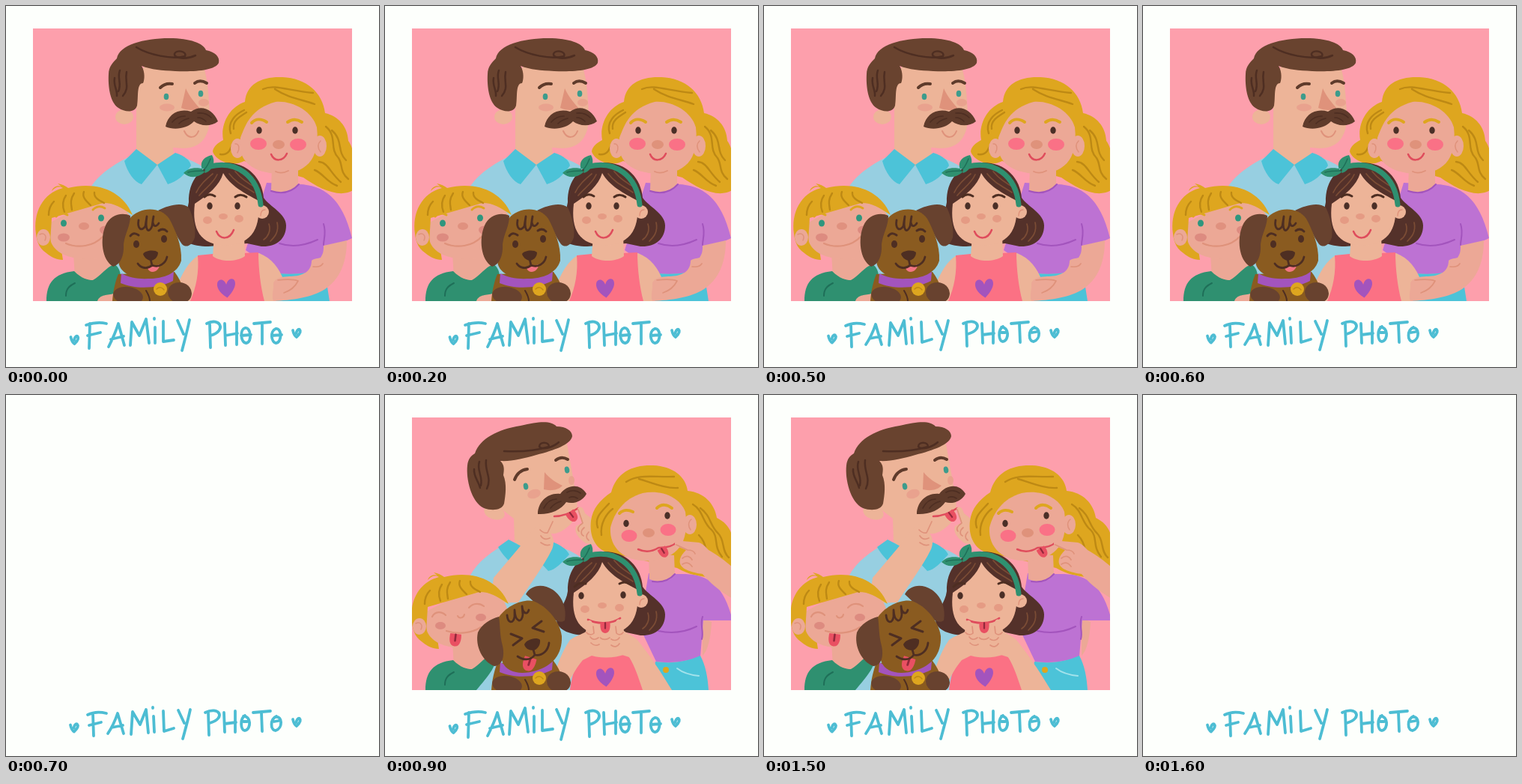
An HTML page with a canvas for the animation above (1800 ms loop, 498 by 482 pixels).

```html
<!DOCTYPE html>
<html lang="en">
<head>
<meta charset="utf-8">
<title>Family photo</title>
<style>
html, body { margin: 0; width: 100%; height: 100%; overflow: hidden; background: #fdfffc; }
canvas { display: block; }
</style>
</head>
<body>
<canvas id="stage" width="498" height="482" role="img" aria-label="Family photo"></canvas>
<script>
const ctx = document.getElementById('stage').getContext('2d');
const LOOP = 1800, SHOT = 900, FLASH = 700, WOBBLE = 500;
const C = {
  paper: '#fdfffc', pink: '#fd9fac', teal: '#4cc3d8', ink: '#4dbdd3',
  skin: '#edb498', rosy: '#eca896', blush: '#df927b', brown: '#69432f', dark: '#4e2e22', tache: '#5f3b2b',
  shirt: '#97cfe1', gold: '#dea61f', goldLine: '#bd8914', purple: '#bd72d3', violet: '#a354bd',
  green: '#2f9070', leaf: '#1f6f58', bob: '#54312a', coral: '#fb7184', hot: '#fa7186',
  mouth: '#df4c5c', red: '#e95062', wine: '#93283b', fur: '#8a5b20', ear: '#68422f', eye: '#4b2f27'
};

const fill = (color, d) => { ctx.fillStyle = color; ctx.fill(new Path2D(d)); };
const line = (color, w, d) => { ctx.strokeStyle = color; ctx.lineWidth = w; ctx.stroke(new Path2D(d)); };
function oval(color, x, y, rx, ry = rx, turn = 0) {
  ctx.fillStyle = color;
  ctx.beginPath();
  ctx.ellipse(x, y, rx, ry, turn, 0, Math.PI * 2);
  ctx.fill();
}
function heart(color, x, y, s, turn = 0) {
  ctx.save();
  ctx.translate(x, y);
  ctx.rotate(turn);
  ctx.scale(s, s);
  fill(color, 'M0 1C-.9 .35 -1.1 -.3 -.9 -.75C-.65 -1.15 -.15 -1 0 -.4C.2 -1 .7 -1.15 .92 -.75C1.1 -.3 .7 .4 0 1Z');
  ctx.restore();
}
function tongue(x, y, turn, s = 1) {
  ctx.save();
  ctx.translate(x, y);
  ctx.rotate(turn);
  ctx.scale(s, s);
  fill(C.red, 'M-7 -5L7 -5C8 2 7 11 0 11C-7 11 -8 2 -7 -5Z');
  line(C.wine, 2.5, 'M0 -4L0 4');
  ctx.restore();
}

function dadCalm() {
  fill(C.shirt, 'M113 242C126 222 149 208 174 197L222 197C242 203 262 212 272 222L285 394L105 394Z');
  oval(C.skin, 158, 148, 12, 10);
  fill(C.skin, 'M174 100L186 78L264 82C269 96 271 120 272 145C273 172 262 190 236 190L223 189L224 199L201 214L174 194Z');
  fill(C.teal, 'M174 191L202 212L181 238C171 235 162 222 158 207Z');
  fill(C.teal, 'M202 212L226 196C238 200 246 206 247 213C238 226 229 234 216 238Z');
  fill(C.brown, 'M148 70C151 52 184 43 218 43C246 43 264 50 267 59C279 61 286 68 284 76C279 86 253 88 226 87C208 86 194 85 181 80C186 88 185 99 183 103C174 103 177 122 175 133C172 143 159 142 150 136C139 129 136 107 137 91C137 81 143 75 148 70Z');
  line(C.dark, 2.5, 'M174 55C190 65 222 72 239 67C242 60 227 58 225 64C224 70 240 72 253 66M152 86C148 96 155 104 150 114M161 88C158 102 166 108 156 120M145 96C143 106 149 112 148 120');
  fill(C.blush, 'M240 110C245 121 252 129 258 136C251 141 241 139 234 136Z');
  oval('#e9a28e', 215, 135.5, 10, 5);
  oval('#e9a28e', 264, 129, 7, 5);
  line(C.tache, 4, 'M206 109C210 105 216 103 222 104M252 103C257 99 263 100 268 103');
  oval('#3c9c8c', 214, 121, 3.3, 4.3);
  oval('#3c9c8c', 260, 117, 3.3, 4.3);
  line(C.blush, 2, 'M238 167C243 178 253 177 257 167');
  fill(C.tache, 'M213 161C216 145 230 136 247 141C260 131 276 137 283 154C273 162 259 160 251 154C242 164 224 166 213 161Z');
  line(C.dark, 1.7, 'M222 155C227 149 233 147 239 147M231 157C235 153 240 151 244 150M256 143C264 142 270 145 274 149M256 149C260 149 264 151 267 154');
}

function dadSilly() {
  fill(C.shirt, 'M113 242C124 222 143 208 165 197L222 200C242 204 262 214 270 226L282 394L105 394Z');
  oval(C.skin, 146, 157, 14, 9, .3);
  fill(C.skin, 'M155 86L243 65C246 83 250 103 253 122C258 140 260 163 245 175C237 182 229 186 222 185L223 202L202 222L173 196L172 165L150 148Z');
  fill(C.teal, 'M165 193L184 203L175 229C162 220 155 210 151 203Z');
  fill(C.teal, 'M206 222L223 196C234 200 243 206 246 213C235 225 228 233 218 235Z');
  fill(C.brown, 'M120 78C127 58 150 46 181 41C206 35 222 34 229 42C242 42 250 48 250 55C248 66 226 74 202 80C184 85 168 89 154 88C160 94 159 100 158 107C163 119 161 133 159 145C156 154 143 155 132 151C115 143 108 112 110 94C111 85 115 81 120 78Z');
  line(C.dark, 2.5, 'M159 75C177 76 199 75 219 69C219 62 206 62 206 69C210 74 224 70 232 63M126 89C122 101 131 108 128 121M135 87C133 103 143 110 136 125M119 99C118 109 125 115 127 124');
  fill(C.blush, 'M213 103C220 112 229 117 237 121C230 128 220 128 212 126Z');
  oval('#e9a28e', 199, 132, 9, 6, -.3);
  oval('#e9a28e', 249, 114, 4, 6);
  line(C.tache, 4, 'M173 113C176 105 182 100 190 99M228 87C233 83 239 83 244 86');
  oval('#3c9c8c', 188, 122, 3.2, 4.5, -.2);
  oval('#3c9c8c', 243, 100, 3.2, 4.5, -.2);
  line(C.mouth, 2.5, 'M226 162C238 162 249 157 258 151');
  tongue(249, 160, -.65, .9);
  fill(C.tache, 'M204 159C204 143 217 130 234 132C244 119 261 118 269 132C263 143 250 146 242 143C235 154 219 160 204 159Z');
  line(C.dark, 1.7, 'M212 151C216 143 222 139 229 139M221 151C225 146 230 143 235 142M243 130C250 126 257 128 261 131M246 137C250 135 254 136 257 138');
  // raised arm and both pulling hands
  fill(C.skin, 'M145 244L178 205L193 186C199 174 213 173 218 161C222 158 226 162 224 169L219 183C227 189 226 201 222 208C212 228 194 252 178 277L140 278Z');
  line(C.blush, 1.7, 'M224 169L217 184C212 185 209 182 207 180M220 191C214 194 210 191 208 188M220 200C214 202 211 199 208 197');
  fill(C.skin, 'M257 151C262 147 265 151 267 158L276 165L281 200L268 198C258 191 252 183 255 175L263 171Z');
  line(C.blush, 1.7, 'M258 153L264 171C258 175 256 179 259 182M266 177C261 181 261 186 265 188M272 183C268 187 268 191 272 194');
}

function momHair(silly) {
  fill(C.gold, silly
    ? 'M302 130C309 103 331 93 358 94C384 95 402 109 404 128C426 130 440 145 443 164C455 170 461 178 464 190L464 239C444 246 414 245 390 231L306 212C285 211 272 193 275 168C277 152 287 140 302 130Z'
    : 'M319 128C321 104 341 94 369 95C401 96 423 116 426 143C444 147 456 161 457 180C462 187 464 195 465 206L465 245C447 258 418 244 397 229L318 207C301 216 279 206 276 194C277 187 284 182 290 179C286 158 298 135 319 128Z');
  line(C.goldLine, 2.4, silly
    ? 'M322 116C338 105 358 110 386 109M339 112C356 117 374 125 391 124M284 177C279 163 290 155 299 145M289 187C287 171 296 158 304 152M411 146C425 154 424 171 436 180C446 190 438 202 450 216M421 151C436 162 433 174 445 185C454 194 449 208 459 217M419 187C432 200 425 213 440 227'
    : 'M343 111C359 104 376 113 410 116M359 111C377 123 396 125 412 131M300 170C295 155 307 144 318 139M286 198C298 200 300 190 304 181M304 164C302 153 313 147 321 142M427 161C443 174 431 190 444 203C450 212 445 221 457 231M435 166C451 180 441 193 454 206M418 208C430 209 433 223 447 235M412 219C423 223 428 235 442 240');
}

function momCalm() {
  momHair(false);
  oval(C.rosy, 309, 190, 9, 13);
  oval(C.rosy, 419, 187, 9, 14);
  line(C.blush, 1.5, 'M306 184C312 184 312 191 309 196M420 180C415 185 417 191 420 195');
  fill(C.purple, 'M348 236L391 238C423 239 449 255 462 310C453 315 438 319 425 320L424 351C401 358 383 359 363 357L320 326Z');
  fill(C.rosy, 'M355 215L390 216L390 238C382 249 368 252 354 246Z');
  line(C.violet, 2, 'M354 247C370 252 382 248 391 238M424 291C428 303 424 311 424 319M365 317C383 323 401 319 416 312');
  fill(C.rosy, 'M313 176C320 158 327 137 360 128C382 126 409 140 415 162C420 207 398 224 365 224C329 223 308 207 313 176Z');
  line(C.gold, 4, 'M328 156C334 150 340 150 348 155M376 155C383 150 389 151 395 155');
  oval(C.eye, 338, 166, 3.7, 4.7);
  oval(C.eye, 386, 166, 3.7, 4.7);
  oval(C.hot, 337, 184, 11, 8);
  oval(C.hot, 390, 185, 11, 8);
  oval(C.blush, 364, 185, 8, 6);
  line(C.mouth, 2.5, 'M354 198C358 208 370 208 375 197');
  line(C.blush, 1.8, 'M360 221C366 224 373 222 377 220');
  fill(C.teal, 'M363 357C385 359 405 357 425 350L432 394L360 394Z');
}

function momSilly() {
  momHair(true);
  oval(C.rosy, 407, 173, 9, 13);
  line(C.blush, 1.5, 'M409 166C404 170 405 176 408 180');
  fill(C.rosy, 'M424 298L436 303C435 321 432 340 424 348Z');
  fill(C.purple, 'M352 238L390 239C425 238 451 246 464 301L425 301L421 349C401 357 382 358 362 356L340 310Z');
  fill(C.rosy, 'M352 212L386 214L387 239C379 251 366 251 353 246Z');
  line(C.violet, 2, 'M357 249C371 251 380 247 387 239M424 296C420 307 426 315 423 326M365 315C384 319 402 316 416 309');
  fill(C.rosy, 'M301 177C306 157 319 138 344 131C370 126 394 137 401 156C407 199 389 217 358 221C324 225 299 207 301 177Z');
  line(C.gold, 4, 'M313 158C318 153 325 153 331 156M363 151C369 145 377 146 383 151');
  oval(C.eye, 322, 171.5, 3.7, 4.7);
  oval(C.eye, 377, 161, 3.7, 4.7);
  oval(C.hot, 326, 188, 10.5, 8);
  oval(C.hot, 378, 180, 10.5, 8);
  oval(C.blush, 352, 184, 8, 6);
  line(C.mouth, 2.5, 'M338 206C347 210 357 209 365 204C374 204 384 203 390 196');
  tongue(371, 208, -.55, .85);
  fill(C.rosy, 'M388 201C384 195 391 191 397 195L419 197C425 199 428 203 432 207C446 215 456 223 464 230L464 272C447 262 433 250 424 239C410 237 396 233 394 225C392 218 398 211 402 207Z');
  line(C.blush, 1.7, 'M389 200L404 207C410 207 413 209 414 212M397 218C403 213 408 216 410 220M397 226C403 222 407 225 410 229');
  fill(C.teal, 'M361 356C384 359 403 356 421 348C428 361 431 377 432 394L355 394Z');
  line('#a3e2eb', 2, 'M390 365C399 372 409 374 419 375');
  oval(C.gold, 375, 367, 4);
}

function boy(silly) {
  const hair = 'M40 304C36 276 49 250 76 243C70 240 66 242 61 247C63 241 69 239 74 241L69 237C75 238 79 240 83 243C119 234 155 245 169 279C153 269 145 263 130 263L61 283L58 332C45 326 41 315 40 304Z';
  fill(C.rosy, 'M90 330L135 322L142 350L112 372L92 362Z');
  fill(C.green, 'M54 394C54 370 64 357 91 354C101 364 109 366 116 366C126 361 134 348 145 345' +
    (silly ? 'C154 358 137 376 122 394Z' : 'C157 352 154 374 150 394Z'));
  line(C.leaf, 2, 'M80 387C80 378 84 374 92 370');
  if (!silly) fill(C.rosy, 'M122 394C125 385 136 386 144 384L160 394Z');
  ctx.save();
  if (silly) ctx.translate(-4, 0);
  fill(C.gold, 'M43 310L70 300L76 339C59 338 47 327 43 310Z');
  fill(C.rosy, 'M56 291C78 278 106 265 142 260C161 270 169 280 168 297C165 325 142 336 112 338C80 338 65 328 60 315Z');
  fill(C.gold, hair);
  oval(C.rosy, 50, 309, 9, 11);
  line(C.blush, 1.5, 'M45 305C51 302 55 307 52 313');
  line(C.goldLine, 2.4, 'M80 253C75 260 75 267 78 275M91 250C85 259 87 265 88 272M104 248C101 256 108 261 113 266M118 249C117 256 125 260 131 263M64 261C58 267 57 273 57 279');
  ctx.restore();
  if (silly) {
    line(C.blush, 2.2, 'M63 296C67 288 76 289 81 294M112 284C118 277 127 278 132 282M82 315C98 320 116 318 128 310');
    oval('#dd8b80', 74, 308, 7, 5);
    oval('#dd8b80', 128, 297, 7, 5);
    line(C.blush, 2, 'M97 295C99 299 105 298 106 293');
    tongue(94, 324, .12, 1.05);
  } else {
    line(C.gold, 3, 'M67 281C71 276 77 276 82 279M116 272C121 267 127 267 132 270');
    oval('#2f967e', 77, 290, 4, 4.5);
    oval('#2f967e', 127, 283, 4, 4.5);
    oval('#dd8b80', 77, 309, 8, 5.5);
    oval('#dd8b80', 132, 299, 7, 5.5);
    oval('#e0917f', 104, 294, 7, 5);
    line(C.blush, 2.2, 'M80 317C96 324 117 321 129 308');
  }
}

function dogBody() {
  fill(C.fur, 'M150 358L225 355C235 368 240 384 239 394L142 394C143 380 146 367 150 358Z');
  fill(C.violet, 'M154 357C174 368 204 366 224 354L223 367C204 377 174 379 153 370Z');
  line(C.dark, 2, 'M187 380C190 385 192 389 192 394');
  oval(C.ear, 163, 387, 20, 12, .15);
  oval(C.gold, 206, 378, 9);
  line(C.goldLine, 1.5, 'M201 378C205 374 209 376 211 379');
  oval(C.ear, 232, 383, 16, 14, .2);
}

function dogCalm() {
  dogBody();
  fill(C.ear, 'M203 273C216 266 235 261 244 269C250 281 254 299 252 309C249 319 241 324 235 318C227 307 223 294 214 285Z');
  fill(C.fur, 'M165 284C178 268 206 267 218 284C226 299 235 319 234 340C229 357 211 364 190 364C169 364 151 357 150 340C151 321 155 300 165 284Z');
  fill(C.ear, 'M166 280C154 274 138 280 133 293C125 311 128 339 143 348C153 345 158 333 157 318C159 303 166 294 166 280Z');
  line(C.dark, 2.8, 'M177 286C175 297 181 302 186 294L188 281C185 301 191 304 195 294L197 281C194 292 199 298 204 290');
  oval(C.dark, 174, 318, 4, 5);
  oval(C.dark, 211, 311, 4, 5);
  line(C.dark, 3, 'M166 307C169 303 173 303 177 306M204 300C208 297 212 298 215 301');
  fill(C.dark, 'M183 331C186 326 199 325 203 329C203 336 197 340 193 340C188 339 184 335 183 331Z');
  fill('#f27483', 'M189 350L205 345C205 355 192 359 189 350Z');
  line(C.dark, 2.8, 'M193 338L195 346C189 352 180 350 176 344M195 346C204 350 213 344 215 335');
}

function dogSilly() {
  dogBody();
  fill(C.ear, 'M188 266C194 254 210 251 224 260C237 269 243 285 240 301C233 306 225 300 219 292L206 283Z');
  fill(C.fur, 'M151 298C161 282 183 272 198 275C216 282 233 301 236 322C237 346 224 361 202 368C182 374 163 371 157 357C150 339 148 318 151 298Z');
  fill(C.ear, 'M152 296C141 299 129 306 124 317C120 335 130 356 146 362C157 361 160 349 157 335C153 321 154 309 152 296Z');
  line(C.dark, 2.8, 'M163 294C164 305 171 306 173 296L173 287C174 304 183 305 184 293L183 282C184 292 190 294 192 287');
  line(C.dark, 3, 'M168 319L183 325L171 334M209 302L197 311L212 316');
  tongue(193, 356, .3, 1.15);
  fill(C.dark, 'M186 333C188 327 202 322 207 327C208 334 203 340 198 341C192 341 187 338 186 333Z');
  line(C.dark, 2.8, 'M198 340L200 347C194 355 184 354 177 349M200 347C210 349 218 341 219 331');
}

function girlHead() {
  fill(C.bob, 'M244 262C243 234 260 210 292 209C324 209 342 231 344 256C352 268 374 277 374 293C374 312 360 322 341 321L322 317L270 321C249 321 230 314 229 301C230 288 242 278 244 262Z');
  oval(C.skin, 342, 275, 9);
  line(C.blush, 1.5, 'M346 272C341 272 340 276 340 280');
  fill(C.skin, 'M278 306L318 306L319 334C307 342 287 342 276 334Z');
  fill(C.skin, 'M252 264C270 252 285 240 290 223C299 240 319 250 337 260C340 293 331 318 294 320C259 319 248 298 252 264Z');
  line('#7b4c35', 1.7, 'M276 224C268 231 259 238 254 249M282 225C276 238 266 243 258 253M298 224C307 236 319 241 331 249M306 221C315 232 325 238 335 243M351 291C354 300 350 308 344 312M362 289C365 302 358 309 353 314');
  line(C.green, 7, 'M273 214C307 206 336 226 340 265');
  fill(C.green, 'M266 218C251 214 243 217 237 223C246 231 257 229 265 222ZM262 218C258 208 265 201 275 199C280 207 277 219 266 223Z');
  line(C.leaf, 1.5, 'M243 222C250 220 257 220 264 220M265 218C269 214 271 209 273 204');
}

function girlCalm() {
  fill(C.skin, 'M278 314L317 314L319 332L338 330C355 337 365 350 371 367L359 394L222 394C229 370 239 344 257 333L277 332Z');
  fill(C.coral, 'M256 333L276 331C285 339 307 339 317 330L337 329C337 351 340 375 345 394L246 394C254 376 258 355 256 333Z');
  girlHead();
  line(C.dark, 3, 'M265 255C269 251 274 251 279 254M306 255C311 251 317 252 321 255');
  oval(C.eye, 272, 267, 3.7, 4.7);
  oval(C.eye, 309, 267, 3.7, 4.7);
  oval('#e59b84', 269, 286, 6, 5);
  oval('#e59b84', 311, 284, 6, 5);
  oval('#e59b84', 290, 281, 6, 4);
  line(C.mouth, 2.5, 'M281 301C286 313 299 312 304 299');
  fill(C.rosy, 'M424 320L455 313C455 344 445 365 426 378C409 389 381 393 357 394C354 387 358 378 357 370C362 358 382 363 393 359C405 356 408 347 408 340C411 337 417 337 420 336C424 330 424 326 424 320Z');
  line(C.blush, 1.7, 'M363 366C372 365 382 364 390 367M390 367C386 375 380 380 371 383M410 348C417 349 421 347 423 344');
}

function girlSilly() {
  fill(C.coral, 'M270 345C286 352 303 351 320 345C336 357 341 374 345 394L247 394C250 373 254 356 270 345Z');
  girlHead();
  fill(C.skin, 'M276 318L319 318L321 346C305 352 285 352 270 346Z');
  line(C.dark, 3, 'M253 256C258 251 263 250 268 252M313 252C318 249 324 250 328 253');
  oval(C.eye, 262, 268, 3.7, 4.7);
  oval(C.eye, 318, 267, 3.7, 4.7);
  oval('#e59b84', 267, 286, 6, 5);
  oval('#e59b84', 313, 284, 6, 5);
  oval('#e59b84', 290, 281, 6, 4);
  line(C.mouth, 2.7, 'M271 300C282 306 303 306 314 298');
  tongue(294, 308, 0, .9);
  line(C.blush, 1.7, 'M287 324C291 327 296 327 300 324');
  fill(C.skin, 'M270 303C273 298 277 302 278 308L280 315C290 321 290 337 282 345L264 354C253 367 246 382 241 394L222 394C226 370 234 346 247 327C254 322 264 319 268 316Z');
  fill(C.skin, 'M315 301C311 297 307 301 308 308L307 317C299 324 300 338 310 345L326 350C334 363 339 379 344 394L383 394C367 367 348 340 336 326C329 321 323 318 319 315Z');
  line(C.blush, 1.7, 'M278 309L279 318C276 321 271 320 269 317M285 324C280 328 276 326 274 323M286 333C280 336 277 333 275 331M308 309L309 318C312 321 316 320 318 317M302 326C307 329 311 327 313 324M302 334C307 338 311 335 313 332');
}

const LETTERS = [
  'M112 424L111 457M107 426C116 423 126 422 134 424M109 440L126 436M137 455C142 445 147 434 150 424L158 453M140 445L157 441M166 453L168 422L178 440L187 418L191 450M199 429L199 450M198 417L198 418M210 421L210 448L224 446M229 420L237 438M245 419C242 434 238 448 235 460M272 425L273 456M268 424C285 415 296 433 273 440M292 424L293 453M308 422L308 452M293 440L309 437M319 430C312 432 313 450 321 450C329 449 327 428 319 430M314 440L327 439M331 424L353 422M342 424L342 451M360 431C352 434 354 450 361 450C369 448 368 429 360 431M355 440L368 439',
  'M116 425L117 455M109 427C117 423 126 423 134 425M111 441L127 437M136 452C142 443 146 434 149 425L157 452M141 444L156 441M167 453L169 423L179 440L187 420L190 451M197 429L198 450M196 417L196 418M210 422L211 449L224 445M230 421L238 438M246 420C243 434 239 448 236 459M270 424L271 454M266 424C284 415 295 431 272 438M291 424L292 450M306 422L306 450M292 439L307 437M319 428C312 432 313 448 319 448C328 446 327 428 317 429M317 436L322 436M330 424L353 422M341 424L342 449M361 429C352 433 353 448 360 448C370 445 369 428 360 430M358 436L364 435'
];
const TICK = 'M-5 -4C-4 1 -2 4 0 5C4 1 6 -3 4 -5C2 -6 0 -3 -.5 0';

function tick(x, y) {
  ctx.save();
  ctx.translate(x, y);
  line(C.ink, 3.8, TICK);
  ctx.restore();
}

function caption(alt) {
  line(C.ink, 3.8, LETTERS[alt]);
  tick(alt ? 91 : 91.5, alt ? 444.5 : 446);
  tick(388, 437);
}

function photo(silly) {
  ctx.save();
  ctx.beginPath();
  ctx.rect(36, 30, 426, 364);
  ctx.clip();
  ctx.fillStyle = C.pink;
  ctx.fillRect(36, 30, 426, 364);
  if (silly) { dadSilly(); momSilly(); } else { dadCalm(); momCalm(); }
  boy(silly);
  if (silly) girlSilly(); else girlCalm();
  heart(C.violet, 294.5, 377, 12.5, -.08);
  if (silly) dogSilly(); else dogCalm();
  ctx.restore();
}

ctx.lineCap = ctx.lineJoin = 'round';
const start = performance.now();
function draw(now) {
  const t = Math.max(0, now - start) % LOOP, beat = t % SHOT;
  ctx.fillStyle = C.paper;
  ctx.fillRect(0, 0, 498, 482);
  if (beat < FLASH) photo(t >= SHOT);
  caption(beat < WOBBLE ? 0 : 1);
  requestAnimationFrame(draw);
}
draw(start);
</script>
</body>
</html>
```
